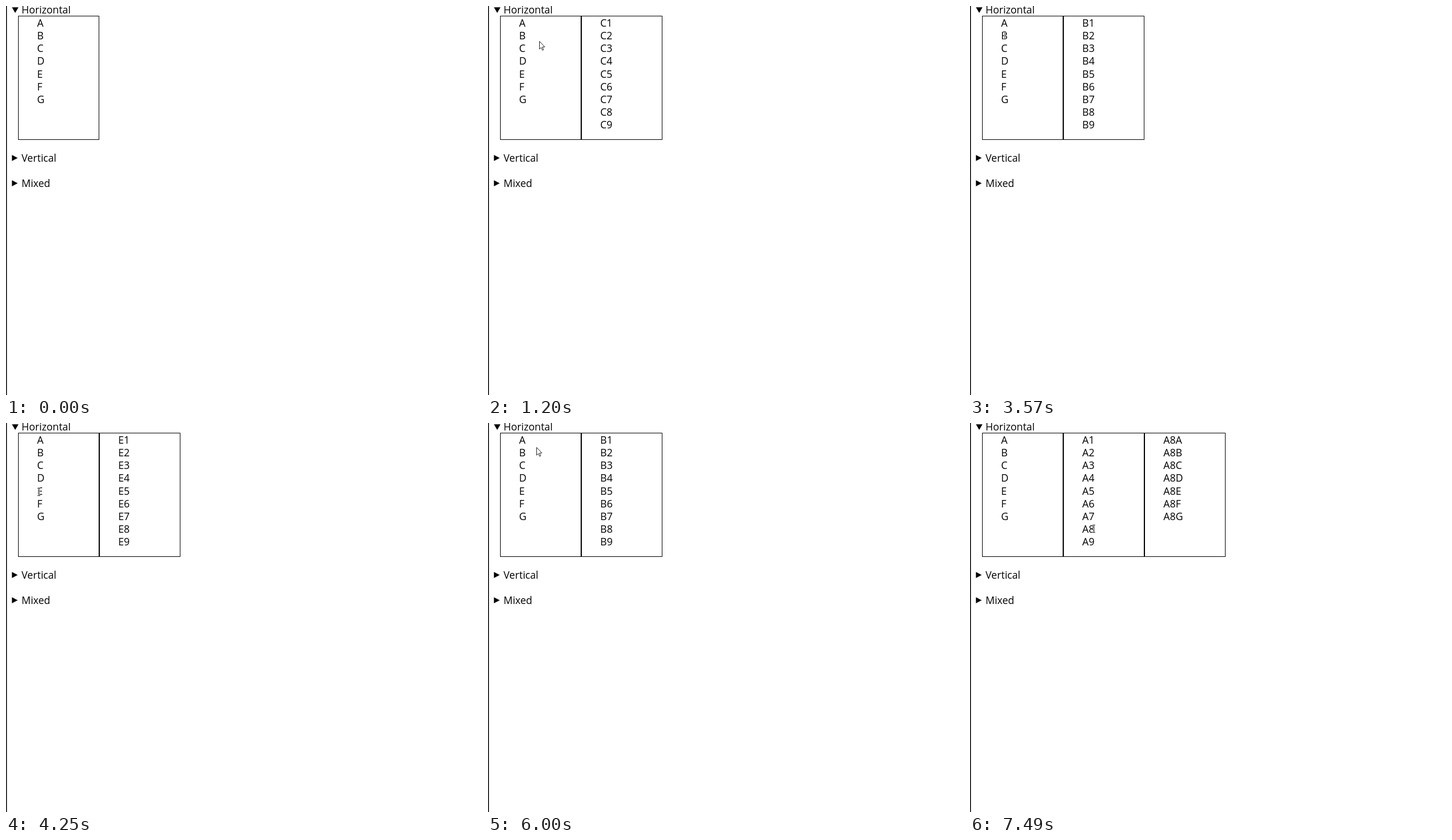
Write an HTML page with a canvas that moves like this. It is 827 px wide and 677 px high and loops after 8 s.

```html
<!DOCTYPE html>
<html lang="en">
<head>
<meta charset="utf-8">
<title>Nested menu</title>
<style>
html, body { margin: 0; width: 100%; height: 100%; overflow: hidden; background: #fff; }
canvas { display: block; }
</style>
</head>
<body>
<canvas id="stage" width="827" height="677"></canvas>
<script>
const LOOP = 8000, TICK = 67;
const ROW = 22.15, TOP = 16.5, LEFT = 21, COL = 141, BOX_H = 216, INDENT = 33;
const LETTERS = [..."ABCDEFG"];
const ctx = document.getElementById("stage").getContext("2d");
ctx.font = '17.6px "Open Sans", "Noto Sans", sans-serif';

// The pointer glides to each place in turn; "via" bends the path.
const ENTRY = [781, 677];
const MOVES = [
  { start: 200, end: 590, to: [264, 250] },
  { start: 790, end: 1200, to: [89, 61] },
  { start: 1270, end: 1530, to: [66, 50] },
  { start: 1680, end: 1810, to: [60.5, 31] },
  { start: 2210, end: 2690, to: [194, 81], via: [190, 10] },
  { start: 2950, end: 3360, to: [24, 20] },
  { start: 3430, end: 3570, to: [60, 51] },
  { start: 3780, end: 4250, to: [57, 120] },
  { start: 4520, end: 5130, to: [195, 72], via: [160, 190] },
  { start: 5730, end: 6000, to: [84, 42] },
  { start: 6070, end: 6140, to: [27, 30] },
  { start: 6340, end: 6540, to: [64, 29.5] },
  { start: 7090, end: 7490, to: [215, 184], via: [235, -10] }
];

const ease = u => u * u * u * (u * (6 * u - 15) + 10);
const mix = (a, b, u) => a.map((v, i) => v + (b[i] - v) * u);

function glide(from, { to, via }, u) {
  const e = ease(u);
  return via ? mix(mix(from, via, e), mix(via, to, e), e) : mix(from, to, e);
}

const numbered = letter => Array.from({ length: 9 }, (_, i) => letter + (i + 1));

function menus({ first, second }) {
  const lists = [LETTERS];
  if (first) lists.push(numbered(first));
  if (second) lists.push(LETTERS.map(l => second + l));
  return lists;
}

// Work out what the pointer opens and whether it rests on text.
function hover(state) {
  const col = Math.floor((state.x - LEFT) / COL);
  const row = Math.floor((state.y - TOP) / ROW);
  const list = menus(state)[col];
  const label = list && list[row];
  if (!label) return;
  if (col === 0) {
    state.first = label;
    state.second = null;
  } else if (label === "A8") {
    state.second = label;
  }
  const dx = state.x - (LEFT + INDENT + col * COL);
  state.beam = dx > 0.5 && dx < ctx.measureText(label).width + 1;
}

function buildStates() {
  let state = { t: 0, x: null, first: null, second: null };
  let from = ENTRY;
  const states = [state];
  for (const move of MOVES) {
    const span = move.end - move.start;
    const steps = Math.round(span / TICK) + 1;
    for (let i = 0; i < steps; i++) {
      const [x, y] = glide(from, move, (i + 1) / steps);
      state = { ...state, t: move.start + span * i / (steps - 1), x, y, beam: false };
      hover(state);
      states.push(state);
    }
    from = move.to;
  }
  return states;
}

function polygon(points) {
  ctx.beginPath();
  points.forEach(([x, y]) => ctx.lineTo(x, y));
  ctx.closePath();
}

function drawHeading(label, y, open) {
  ctx.fillText(label, 27, y + 6);
  polygon(open ? [[10.3, y - 4.8], [21.7, y - 4.8], [16, y + 5]] : [[10.3, y - 5.3], [20.3, y], [10.3, y + 5.3]]);
  ctx.fill();
}

function drawList(items, col) {
  const x = LEFT + col * COL;
  ctx.strokeRect(x + 0.5, 17.5, COL - 1, BOX_H - 1);
  items.forEach((item, i) => ctx.fillText(item, x + INDENT, Math.round(36 + i * ROW)));
}

function drawArrow() {
  polygon([[0.5, 0.5], [0.5, 14], [3.5, 11.3], [5.6, 16], [7.6, 15.1], [5.5, 10.4], [9.6, 10.2]]);
  ctx.fillStyle = "#fff";
  ctx.fill();
  ctx.strokeStyle = "#222";
  ctx.stroke();
}

function drawBeam() {
  ctx.beginPath();
  for (const y of [-6.5, 6.5]) {
    ctx.moveTo(-2.5, y);
    ctx.lineTo(2.5, y);
  }
  ctx.moveTo(0.5, -6.5);
  ctx.lineTo(0.5, 6.5);
  ctx.strokeStyle = "#fff";
  ctx.lineWidth = 2.4;
  ctx.stroke();
  ctx.strokeStyle = "#333";
  ctx.lineWidth = 1;
  ctx.stroke();
}

function draw(state) {
  ctx.fillStyle = "#fff";
  ctx.fillRect(0, 0, 827, 677);
  ctx.fillStyle = ctx.strokeStyle = "#000";
  ctx.lineWidth = 1;
  ctx.fillRect(0, 0, 1.5, 677);
  drawHeading("Horizontal", 7, true);
  drawHeading("Vertical", 264.5, false);
  drawHeading("Mixed", 308.5, false);
  menus(state).forEach(drawList);
  if (state.x === null) return;
  ctx.save();
  ctx.translate(Math.round(state.x), Math.round(state.y));
  if (state.beam) drawBeam(); else drawArrow();
  ctx.restore();
}

const states = buildStates();

function frame() {
  const t = performance.now() % LOOP;
  draw(states.filter(s => s.t <= t + 6).pop());
  requestAnimationFrame(frame);
}
frame();
</script>
</body>
</html>
```
